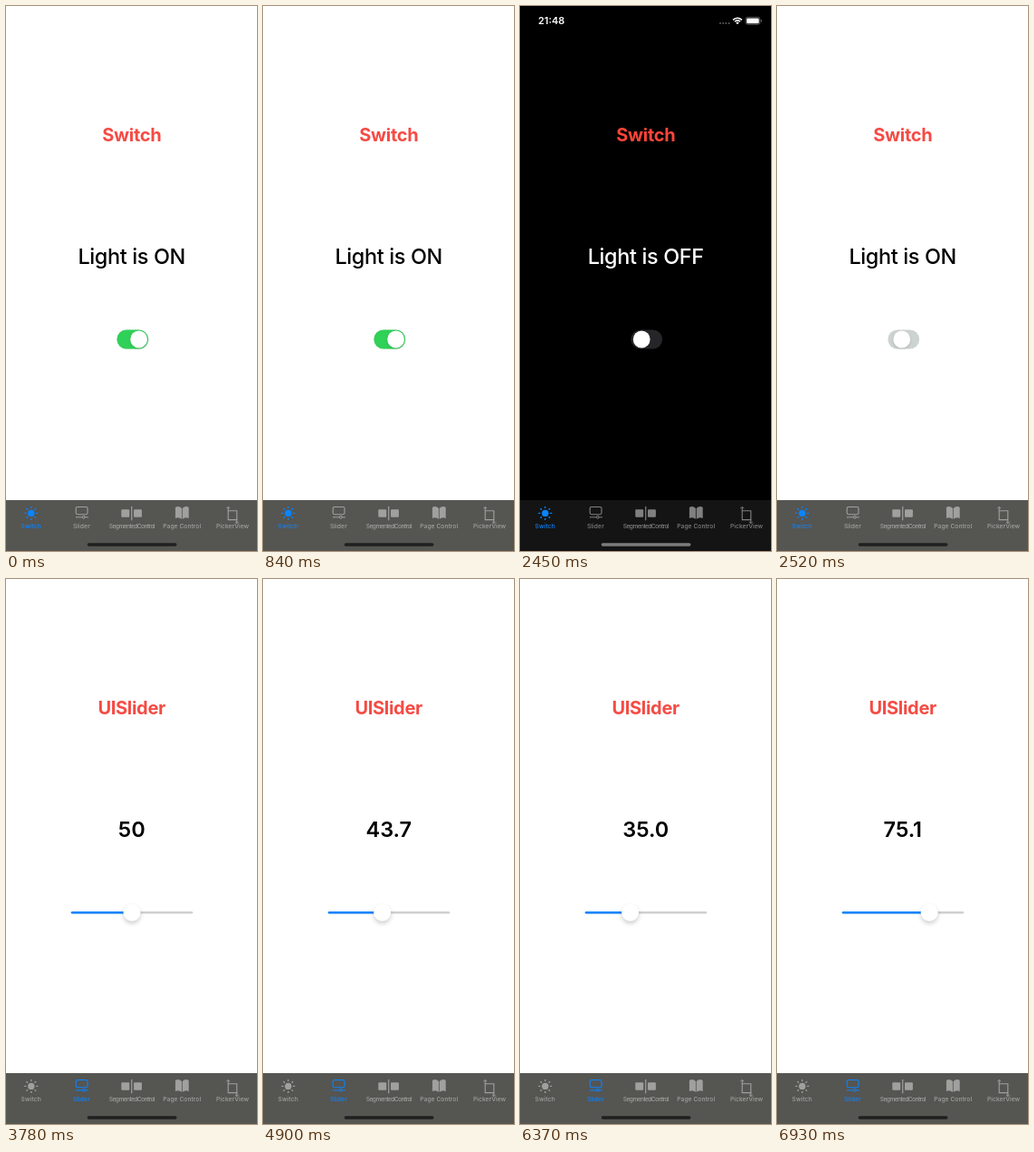
Write an HTML page with a canvas that moves like this. It is 277 px wide and 600 px high and loops after 8000 ms.

```html
<!DOCTYPE html>
<html lang="en">
<head>
<meta charset="utf-8">
<title>Controls demo</title>
<style>
html, body { margin: 0; width: 100%; height: 100%; overflow: hidden; background: #fff; }
canvas { display: block; width: 277px; height: 600px; }
</style>
</head>
<body>
<canvas id="stage"></canvas>
<script>
const W = 277, H = 600, LOOP = 8000, STEP = 70;
const BLUE = '#0a84ff';
const canvas = document.getElementById('stage');
const ctx = canvas.getContext('2d');
const dpr = window.devicePixelRatio || 1;
canvas.width = W * dpr;
canvas.height = H * dpr;

// Smooth 0..1 progress that begins at `start` and lasts `span` ms
function ease(t, start, span) {
  const u = Math.min(1, Math.max(0, (t - start) / span));
  return u * u * (3 - 2 * u);
}

function text(str, x, y, size, weight, color, spacing = 0) {
  ctx.font = `${weight} ${size}px Inter, sans-serif`;
  ctx.letterSpacing = spacing + 'px';
  ctx.textAlign = 'center';
  ctx.fillStyle = color;
  ctx.fillText(str, x + spacing / 2, y);
}

function box(x, y, w, h, r, color) {
  ctx.fillStyle = color;
  ctx.beginPath();
  ctx.roundRect(x, y, w, h, r);
  ctx.fill();
}

function disc(x, y, r, color) {
  ctx.fillStyle = color;
  ctx.beginPath();
  ctx.arc(x, y, r, 0, Math.PI * 2);
  ctx.fill();
}

function line(points, color, width) {
  ctx.strokeStyle = color;
  ctx.lineWidth = width;
  ctx.beginPath();
  points.forEach(([x, y]) => ctx.lineTo(x, y));
  ctx.stroke();
}

function knob(x, y, r, shadow, blur, drop) {
  ctx.save();
  ctx.shadowColor = shadow;
  ctx.shadowBlur = blur * dpr;
  ctx.shadowOffsetY = drop * dpr;
  disc(x, y, r, '#fff');
  ctx.restore();
}

function statusBar() {
  text('21:48', 34.6, 20.3, 11, 600, '#fff');
  for (let i = 0; i < 4; i++) disc(221 + i * 3.2, 19, 1, '#5c5c5c');
  ctx.lineCap = 'butt';
  ctx.strokeStyle = '#fff';
  ctx.lineWidth = 1.6;
  for (const r of [4.1, 6.7]) {
    ctx.beginPath();
    ctx.arc(240, 20, r, -Math.PI * 0.76, -Math.PI * 0.24);
    ctx.stroke();
  }
  ctx.fillStyle = '#fff';
  ctx.beginPath();
  ctx.moveTo(240, 20.3);
  ctx.arc(240, 20, 2.3, -Math.PI * 0.78, -Math.PI * 0.22);
  ctx.fill();
  ctx.strokeStyle = '#777';
  ctx.lineWidth = 0.7;
  ctx.beginPath();
  ctx.roundRect(249, 12.3, 15.8, 8, 2.3);
  ctx.stroke();
  box(250.1, 13.4, 13.6, 5.8, 1.3, '#fff');
  box(265.7, 15, 1, 2.7, 0.5, '#777');
}

function sunIcon(c) {
  disc(27.8, 558.4, 3.7, c);
  for (let i = 0; i < 8; i++) {
    const a = i * Math.PI / 4, dx = Math.cos(a), dy = Math.sin(a);
    line([[27.8 + dx * 5.9, 558.4 + dy * 5.9], [27.8 + dx * 7, 558.4 + dy * 7]], c, 1.3);
  }
}

function sliderIcon(c) {
  ctx.strokeStyle = c;
  ctx.lineWidth = 1.1;
  ctx.beginPath();
  ctx.roundRect(77.2, 551.5, 12.8, 8.2, 1.6);
  ctx.stroke();
  line([[77, 562.8], [84, 562.8]], c, 1);
  line([[87.5, 562.8], [90.5, 562.8]], c, 1);
  ctx.beginPath();
  ctx.arc(85.8, 562.8, 1.4, 0, Math.PI * 2);
  ctx.stroke();
}

function segmentIcon(c) {
  box(127.3, 554.3, 8.9, 8.5, 1, c);
  box(141, 554.3, 8.9, 8.5, 1, c);
  line([[138.7, 551.3], [138.7, 565.8]], c, 1.2);
}

function bookIcon(c) {
  ctx.fillStyle = c;
  for (const side of [-1, 1]) {
    const x = d => 194.3 + side * d;
    ctx.beginPath();
    ctx.moveTo(x(0.4), 553);
    ctx.quadraticCurveTo(x(3.8), 549.5, x(7.4), 552);
    ctx.lineTo(x(7.4), 564);
    ctx.quadraticCurveTo(x(3.8), 562.2, x(0.4), 564.8);
    ctx.fill();
  }
}

function cropIcon(c) {
  line([[245.2, 552], [245.2, 565.6], [254.8, 565.6]], c, 1.1);
  line([[245.2, 555.8], [254.8, 555.8], [254.8, 569]], c, 1.1);
  line([[243.5, 553], [245.2, 551.3], [246.9, 553]], c, 0.9);
  line([[253.1, 568], [254.8, 569.7], [256.5, 568]], c, 0.9);
}

const TABS = [
  ['Switch', 27.7, sunIcon, 0.15],
  ['Slider', 83.3, sliderIcon, 0.1],
  ['SegmentedControl', 139.2, segmentIcon, -0.62],
  ['Page Control', 194.2, bookIcon, 0.05],
  ['PickerView', 250, cropIcon, 0.05]
];

function tabBar(dark, active) {
  box(0, 544, W, 56, 0, dark ? '#141414' : '#555552');
  ctx.lineCap = 'round';
  TABS.forEach(([label, x, icon, spacing], i) => {
    const color = i === active ? BLUE : dark ? '#808080' : '#a0a09e';
    icon(color);
    text(label, x, 574.6, 6.7, 500, color, spacing);
  });
  box(89.7, 591.2, 98.8, 3.5, 1.75, dark ? '#7c7c7c' : '#202020');
}

function switchPage(t, dark) {
  text('Switch', 139, 149.2, 20, 700, dark ? '#ff453a' : '#f54b44', -0.3);
  text(dark ? 'Light is OFF' : 'Light is ON', 138.8, 284.2, 23.4, 500, dark ? '#fff' : '#000', -0.35);

  const on = t < 2000 ? 1 - ease(t, 840, 280) : ease(t, 2430, 250);
  const tint = t < 2000 ? 1 - ease(t, 910, 280) : ease(t, 2480, 330);
  box(122.4, 356.5, 34.7, 21, 10.5, 'rgba(120,120,128,0.32)');
  ctx.globalAlpha = tint;
  box(122.4, 356.5, 34.7, 21, 10.5, '#30d158');
  ctx.globalAlpha = 1;
  knob(134 + 12.6 * on, 367, 9.4, 'rgba(0,0,0,0.15)', 3, 1);
}

function sliderPage(t) {
  const value = 50 - 34.7 * ease(t, 4690, 770) + 59.8 * ease(t, 6020, 910);
  text('UISlider', 138.8, 149.2, 20, 700, '#f54b44', -0.3);
  text(t < 4760 ? '50' : value.toFixed(1), 138.8, 284.4, 23.5, 600, '#000');

  const x = 139 + (value - 50) * 1.163;
  box(71.8, 365.9, 134.4, 2.6, 1.3, '#cfcfd1');
  box(71.8, 365.9, x - 71.8, 2.6, 1.3, BLUE);
  knob(x, 367.2, 9.5, 'rgba(0,0,0,0.2)', 5, 2.5);
}

function draw(t) {
  const dark = t >= 910 && t < 2520;
  const onSlider = t >= 3780;
  ctx.setTransform(dpr, 0, 0, dpr, 0, 0);
  box(0, 0, W, H, 0, dark ? '#000' : '#fff');
  if (dark) statusBar();
  if (onSlider) sliderPage(t);
  else switchPage(t, dark);
  tabBar(dark, onSlider ? 1 : 0);
}

const begin = performance.now();
function tick() {
  const t = (performance.now() - begin) % LOOP;
  draw(Math.floor(t / STEP) * STEP);
  requestAnimationFrame(tick);
}
tick();
</script>
</body>
</html>
```
